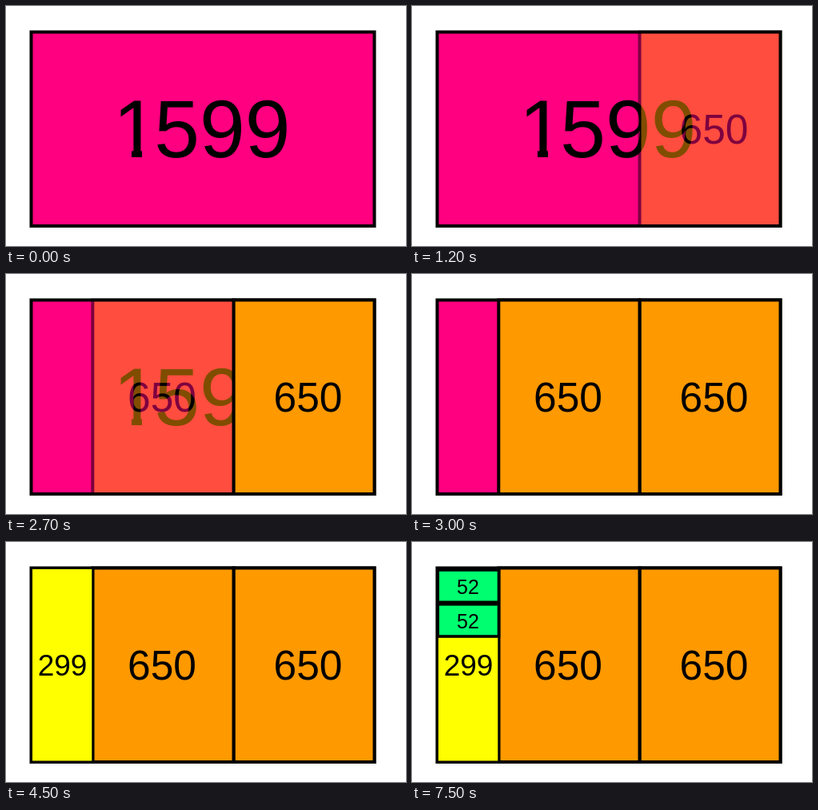
An HTML page for the animation above (8 s loop, 500 by 300 pixels).

```html
<!DOCTYPE html>
<html lang="en">
<head>
<meta charset="utf-8">
<title>Rectangle split into parts</title>
<style>
  html, body { margin: 0; width: 100%; height: 100%; overflow: hidden; background: #fff; }
  svg { display: block; width: 500px; height: 300px; }
  text { font-family: "Liberation Sans", Arial, sans-serif; text-anchor: middle; }
  rect { stroke: #000; }
</style>
</head>
<body>
<svg viewBox="0 0 500 300">
  <!-- Trims the foot of the digit 1 -->
  <clipPath id="footless"><path d="M130 100H190V180H170V195H157V180H130Z"/></clipPath>
  <rect x="31.5" y="32.5" width="429" height="242.5" fill="#ff0080" stroke-width="4"/>
  <g font-size="102">
    <text x="162.2" y="189" clip-path="url(#footless)">1</text>
    <text x="270.4" y="189">599</text>
  </g>
</svg>
<script>
const LOOP = 8000, STEP = 100, STEPS = 6;
const svg = document.querySelector("svg");

const parts = [
  { start: 1000, label: 650, size: 51.5, color: "#ff9900", box: [284.5, 32.5, 460.5, 275], text: [377.5, 172], line: 4 },
  { start: 2500, label: 650, size: 51.5, color: "#ff9900", box: [108.3, 32.5, 284.5, 275], text: [195, 171.5], line: 4 },
  { start: 4000, label: 299, size: 37, color: "#ffff00", box: [31.5, 32.5, 108.8, 275], text: [70.5, 167], line: 3 },
  { start: 5500, label: 52, size: 25, color: "#00ff70", box: [32.3, 35, 108.5, 75.3], text: [70, 65], line: 3.6 },
  { start: 7000, label: 52, size: 25, color: "#00ff70", box: [32.3, 77.8, 108.5, 118], text: [70, 107.5], line: 3.6 }
];

function add(parent, tag, attributes) {
  const node = document.createElementNS(svg.namespaceURI, tag);
  for (const [name, value] of Object.entries(attributes)) node.setAttribute(name, value);
  return parent.appendChild(node);
}

for (const part of parts) {
  const [left, top, right, bottom] = part.box;
  const [x, y] = part.text;
  part.group = add(svg, "g", { opacity: 0 });
  add(part.group, "rect", {
    x: left, y: top, width: right - left, height: bottom - top,
    fill: part.color, "stroke-width": part.line
  });
  add(part.group, "text", { x, y, "font-size": part.size }).textContent = part.label;
}

// Each part fades in over six discrete steps.
function draw(now) {
  const time = now % LOOP;
  for (const { group, start } of parts) {
    const step = Math.floor((time - start) / STEP) + 1;
    group.setAttribute("opacity", Math.max(0, Math.min(1, step / STEPS)));
  }
}

const began = performance.now();
function tick() {
  draw(performance.now() - began);
  requestAnimationFrame(tick);
}
tick();
</script>
</body>
</html>
```
